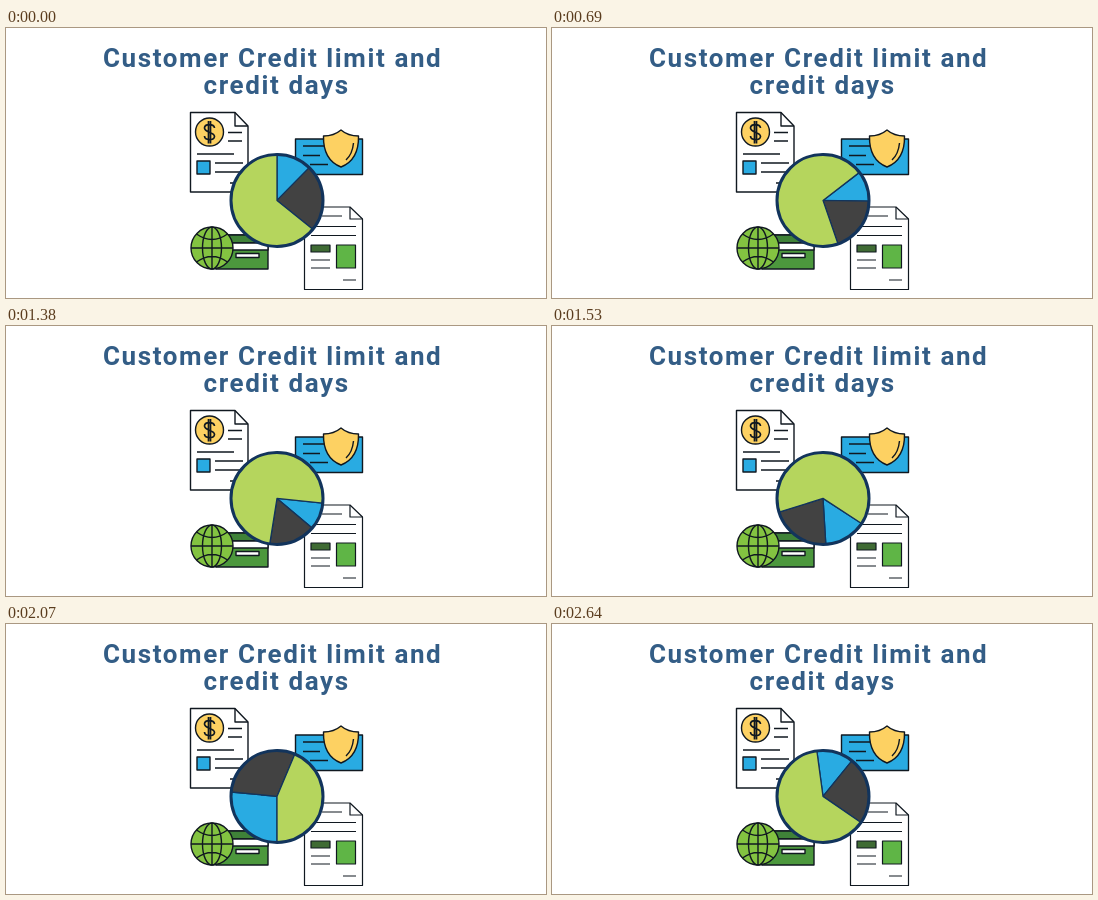
Animation, 540 px wide and 270 px high, one loop 2670 ms. Source, as an HTML page:

```html
<!DOCTYPE html>
<html lang="en">
<head>
<meta charset="utf-8">
<title>Credit limit</title>
<style>
  html, body { margin: 0; width: 100%; height: 100%; overflow: hidden; background: #fff; }
  svg { display: block; width: 100vw; height: 100vh; }
  .title { font: 600 26px Roboto, sans-serif; letter-spacing: 1.6px; fill: #335d86; }
  .icons { stroke: #101820; stroke-width: 1.4; fill: none; stroke-linejoin: round; }
  .paper { fill: #fff; }
  .gold { fill: #fdd162; }
  .blue { fill: #29abe2; }
  .dark { fill: #424242; }
  .lime { fill: #b5d55d; }
  .pie { stroke: #12345c; stroke-width: 1.3; stroke-linejoin: round; }
</style>
</head>
<body>
<svg viewBox="0 0 540 270">
  <g class="title">
    <text x="97" y="39">Customer Credit limit and</text>
    <text x="197.500" y="66">credit days</text>
  </g>

  <g class="icons">
    <!-- Invoice -->
    <path class="paper" d="M184.500 84.500H229L242 98V164H184.500Z"/>
    <path d="M229 84.500V98H242M222 104.500H236M222 113H236M191 126H228M209 135H237M209 144H237M224 155H236"/>
    <circle class="gold" cx="203.5" cy="104" r="14"/>
    <path stroke-width="1.7" d="M208.500 100C208 95.500 198.500 95.500 198.500 100S208.500 104 208.500 108.500S198.500 112.500 198.500 108M202.500 93V115.500M204.500 93V115.500"/>

    <path class="blue" d="M191 133H204V146H191Z"/>

    <!-- Protected card -->
    <path class="blue" d="M289.500 111H356.500V146.500H289.500Z"/>
    <path d="M297 118H320M297 127.500H314M304 136.500H322"/>
    <path class="gold" d="M335 102Q328 108 317.500 108Q317 132 335 139Q353 132 352.500 108Q342 108 335 102Z"/>
    <path d="M347.500 115Q346.500 126 340 132"/>

    <!-- Payment card and globe -->
    <path fill="#4c983d" d="M210 207H262V241H210Z"/>
    <path fill="#3f8238" d="M210 207H262V215H210Z"/>
    <path class="paper" d="M220 215H262V222H220ZM230 225.500H253V229.500H230Z"/>
    <circle fill="#83c341" cx="206" cy="220" r="21"/>
    <ellipse cx="206" cy="220" rx="9.500" ry="21"/>
    <path d="M206 199V241M185 220H227M190.500 206Q206 217 221.500 206M190.500 234Q206 223 221.500 234"/>

    <!-- Report -->
    <g stroke-width="1.2">
      <path class="paper" d="M298.500 179H344L356.500 191V261.500H298.500Z"/>
      <path d="M344 179V191H356.500M316 188H336M305 198.500H350M305 207.500H350M305 232H324M305 240H324M337 252H350"/>
      <path fill="#3f6b34" d="M305 217H324V224H305Z"/>
      <path fill="#5fb546" d="M330.500 217H349.500V240H330.500Z"/>
    </g>
  </g>

  <g class="pie" transform="translate(271 172.400)">
    <path class="blue"/>
    <path class="dark"/>
    <path class="lime"/>
    <circle r="46" fill="none" stroke-width="3"/>
  </g>
</svg>
<script>
  const LOOP = 2670, STEP = 30, PHASE = 450, RADIUS = 46;

  // Clockwise degrees from the top: blue start, blue end, dark end; one row per phase boundary.
  const poses = [
    [0, 44.5, 129],
    [0, 44.5, 129],
    [95, 128.7, 187],
    [95, 128.7, 187],
    [176, 267, 377],
    [182, 280, 386],
    [360, 404.5, 489]
  ];
  const slices = document.querySelectorAll('.pie path');

  const ease = p => (1 - Math.cos(Math.PI * p)) / 2;

  function rim(degrees) {
    const a = degrees * Math.PI / 180;
    return `${RADIUS * Math.sin(a)} ${-RADIUS * Math.cos(a)}`;
  }

  function wedge(from, to) {
    const large = to - from > 180 ? 1 : 0;
    return `M0 0L${rim(from)}A${RADIUS} ${RADIUS} 0 ${large} 1 ${rim(to)}Z`;
  }

  function draw(now) {
    const t = Math.floor(now % LOOP / STEP) * STEP;
    const phase = Math.floor(t / PHASE);
    const k = ease(t / PHASE - phase);
    const edges = poses[phase].map((a, i) => a + (poses[phase + 1][i] - a) * k);
    edges.push(edges[0] + 360);
    slices.forEach((slice, i) => slice.setAttribute('d', wedge(edges[i], edges[i + 1])));
  }

  const start = performance.now();
  function tick() {
    draw(performance.now() - start);
    requestAnimationFrame(tick);
  }
  tick();
</script>
</body>
</html>
```
